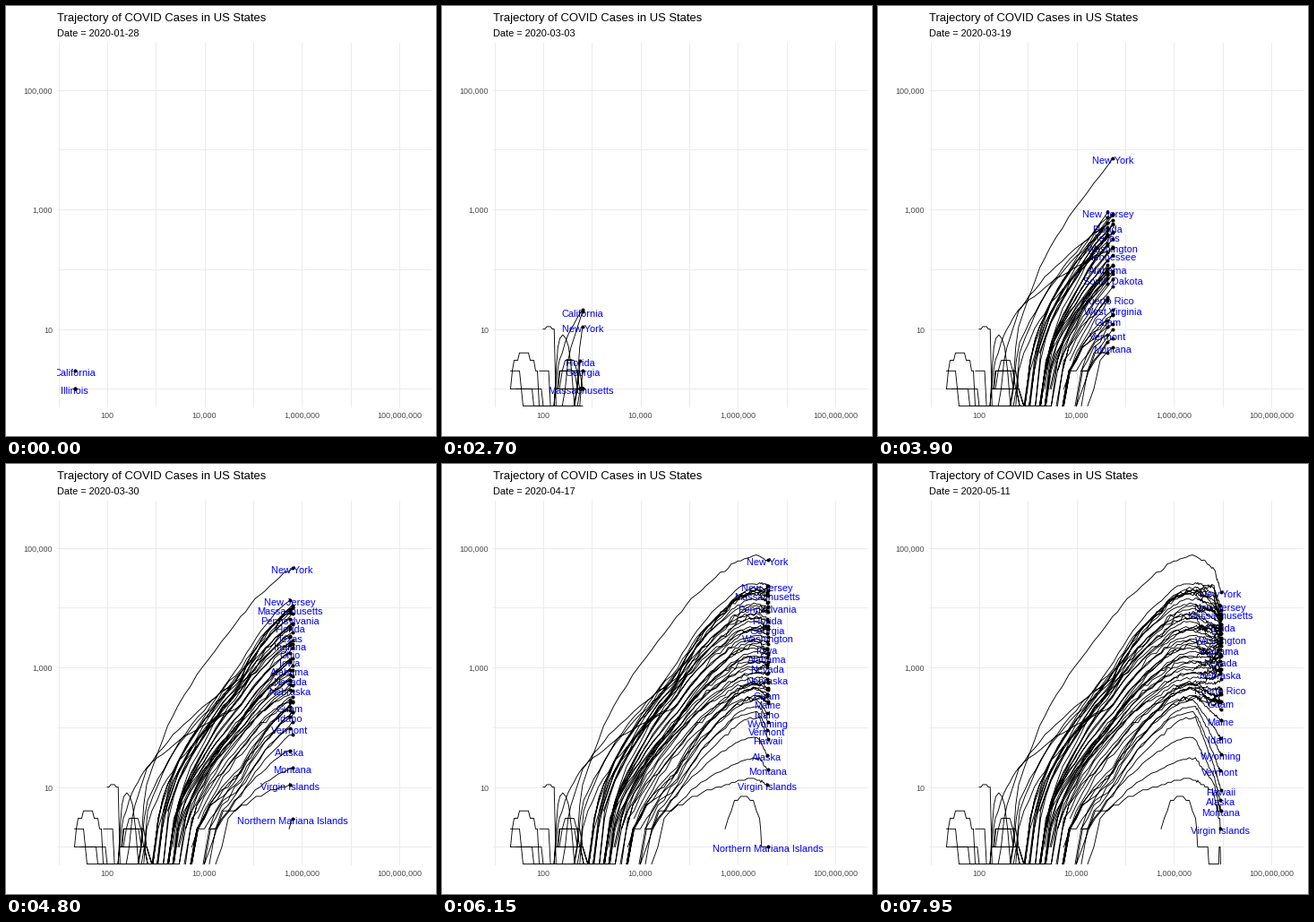
These frames come from a looping animation (480 px wide and 480 px high, 8 s). A matplotlib script:

```python
import matplotlib.pyplot as plt
import numpy as np
from matplotlib.animation import FuncAnimation
from matplotlib.patches import Rectangle

SIZE, DPI = 480, 72
LEFT, TOP, RIGHT, BOTTOM = 57, 41, 474, 447
X10, X_DECADE = 58.5, 54.34       # pixel of 10 cumulative tests, pixels per decade
Y1, Y_DECADE = 427.4, 66.75       # pixel of one case, pixels per decade
LABEL_GAP = 8.7
DAYS = np.arange(105)
rng = np.random.default_rng(20)

# From the hardest hit to the least.
STATES = [
    "New York", "New Jersey", "Illinois", "Massachusetts", "California",
    "Pennsylvania", "Maryland", "Florida", "Connecticut", "Texas", "Georgia",
    "Indiana", "Washington", "Ohio", "Tennessee", "Iowa", "Rhode Island",
    "Alabama", "Kentucky", "Nevada", "South Dakota", "Nebraska",
    "New Hampshire", "Puerto Rico", "West Virginia", "Guam", "Maine", "Idaho",
    "Wyoming", "Vermont", "Hawaii", "Alaska", "Montana", "Virgin Islands",
]
LATE_STATE = "Northern Mariana Islands"
LABEL_FIRST = {"Illinois", "New Jersey", "Florida", "Alabama", "Kentucky",
               "Nevada", "Guam", "Vermont", "Hawaii"}
EARLY_START = {"Washington": 25, "California": 29, "New York": 33,
               "Florida": 34, "Georgia": 34.7, "Massachusetts": 34.9}

# Small clusters: first day, last day, cases at the ends, cases in the middle.
CLUSTERS = {
    "California": [(0, 15, 2, 4)],
    "Illinois": [(0, 6, 1, 2)],
    "Washington": [(0, 12, 1, 1)],
    "Massachusetts": [(4, 18, 1, 1)],
    "Texas": [(17, 22, 2, 2), (26, 32, 2, 8)],
    "Nebraska": [(19, 25, 10, 11)],
    LATE_STATE: [(61, 73, 2, 7), (74, 84, 1, 1), (101, 103, 1, 1)],
}

# Height on each key day as a function of rank.
KEY_DAYS = [51, 72, 90, 104]
RANKS = [0, 1, 7, 17, 22, 25, 30, 33]
HEIGHTS = [
    [171, 231, 247, 293, 314, 350, 370, 385],
    [103, 133, 167, 215, 245, 252, 283, 352],
    [116, 137, 179, 216, 245, 265, 337, 366],
    [142, 159, 182, 206, 242, 266, 363, 400],
]


def tests_x(day):
    knots = [0, 19, 27, 35, 41, 51, 61, 72, 90, 104]
    pixels = [76.5, 114.5, 131, 157, 192, 262, 316, 354.5, 375, 382.5]
    return np.interp(day, knots, pixels)


def growth(heights, start, noise):
    """Whole cases per day: steep climb, levelling off, then decline."""
    early, peak = heights[:2]
    rise = np.clip((DAYS - start) / (51 - start), 0, 1)
    left = np.clip((72 - DAYS) / 21, 0, 1)
    y = np.select(
        [DAYS < 51, DAYS < 72],
        [Y1 + (early - Y1) * rise ** 0.6, peak + (early - peak) * left ** 2.2],
        np.interp(DAYS, KEY_DAYS, heights))
    y += rng.normal(0, noise, len(DAYS)) * (DAYS > 36)
    cases = np.maximum(1, np.rint(10 ** ((Y1 - y) / Y_DECADE)))
    return np.where(DAYS < start, 0, cases)


def make_path(cases, clusters, first_day, lag=0):
    """Pixel path; zero cases lie on the panel's lower edge."""
    for begin, end, low, high in clusters:
        span = (DAYS >= begin) & (DAYS <= end)
        phase = (DAYS[span] - begin) / (end - begin)
        cases[span] = np.rint(low + (high - low) * np.sin(np.pi * phase))
    first_day = min([first_day, *(c[0] for c in clusters)])
    y = np.where(cases > 0, Y1 - Y_DECADE * np.log10(np.maximum(cases, 1)),
                 BOTTOM - 0.5)
    return tests_x(DAYS - lag), np.where(DAYS < first_day, np.nan, y)


def state_path(rank, name="", noise=0.8, drift=0, clusters=()):
    heights = np.array([np.interp(rank, RANKS, row) for row in HEIGHTS])
    heights += rng.uniform(-drift, drift, 4)
    start = EARLY_START.get(name)
    if start is None:
        start = 36 + 0.06 * max(0, heights[0] - 230) + rng.uniform(0, 3)
    cases = growth(heights, start, noise)
    lag = 0.8 * (int(rank) % 2)
    return name, *make_path(cases, clusters, start - rng.integers(0, 2), lag)


def build_paths():
    paths = [state_path(rank, name, clusters=CLUSTERS.get(name, ()))
             for rank, name in enumerate(STATES)]
    paths.sort(key=lambda path: path[0] not in LABEL_FIRST)
    late = make_path(np.zeros(len(DAYS)), CLUSTERS[LATE_STATE], len(DAYS))
    paths.append((LATE_STATE, *late))
    for i in range(20):
        hold = [(26, 35, 1, 1 + i % 3)] if i % 4 == 0 else []
        paths.append(state_path(rng.uniform(2, 26), noise=1.5, drift=12,
                                clusters=hold))
    return paths


paths = build_paths()

plt.rcParams["font.family"] = "Liberation Sans"
fig = plt.figure(figsize=(SIZE / DPI, SIZE / DPI), dpi=DPI, facecolor="white")
ax = fig.add_axes([0, 0, 1, 1])
ax.set(xlim=(0, SIZE), ylim=(SIZE, 0))
ax.axis("off")
panel = Rectangle((LEFT, TOP), RIGHT - LEFT, BOTTOM - TOP, fill=False, lw=0)
ax.add_patch(panel)

grid = dict(color="#EBEBEB", lw=1, snap=True, zorder=0)
tick = dict(size=9, color="#4D4D4D")
for i in range(8):
    x = X10 + i * X_DECADE
    ax.plot([x, x], [TOP, BOTTOM], **grid)
    if i % 2:
        ax.text(x, 460, f"{10 ** (i + 1):,}", ha="center", **tick)
for i in range(6):
    y = Y1 - i * Y_DECADE
    ax.plot([LEFT, RIGHT], [y, y], **grid)
    if i % 2:
        ax.text(52, y + 4, f"{10 ** i:,}", ha="right", **tick)

ax.text(LEFT, 17, "Trajectory of COVID Cases in US States", size=13)
subtitle = ax.text(LEFT, 34, "", size=11)
labels = {name: ax.text(0, 0, name, size=11, color="blue", ha="center",
                        zorder=2, clip_on=True)
          for name, _, _ in paths if name}
trails, = ax.plot([], [], color="black", lw=0.9, zorder=3)
dots, = ax.plot([], [], "o", color="black", ms=4, mew=0, zorder=4)
for artist in (trails, dots, *labels.values()):
    artist.set_clip_path(panel)


def update(frame):
    step = frame // 3
    day = max(0, round(1.965 * step - 0.4))
    subtitle.set_text(f"Date = {np.datetime64('2020-01-28') + day}")

    line_x, line_y, ends, taken = [], [], [], []
    for name, x, y in paths:
        line_x += [*x[:day + 1], np.nan]
        line_y += [*y[:day + 1], np.nan]
        end_x, end_y = x[day], y[day]
        present = end_y < 440
        if present:
            ends.append((end_x, end_y))
        if name:
            free = present and all(abs(end_y - t) >= LABEL_GAP for t in taken)
            labels[name].set_visible(free)
            if free:
                taken.append(end_y)
                labels[name].set_position((end_x, end_y + 6))
    trails.set_data(line_x, line_y)
    dots.set_data(*zip(*ends))
    return trails, dots, subtitle, *labels.values()


anim = FuncAnimation(fig, update, frames=160, interval=50, repeat=True,
                     repeat_delay=0, blit=False)
plt.show()
```
